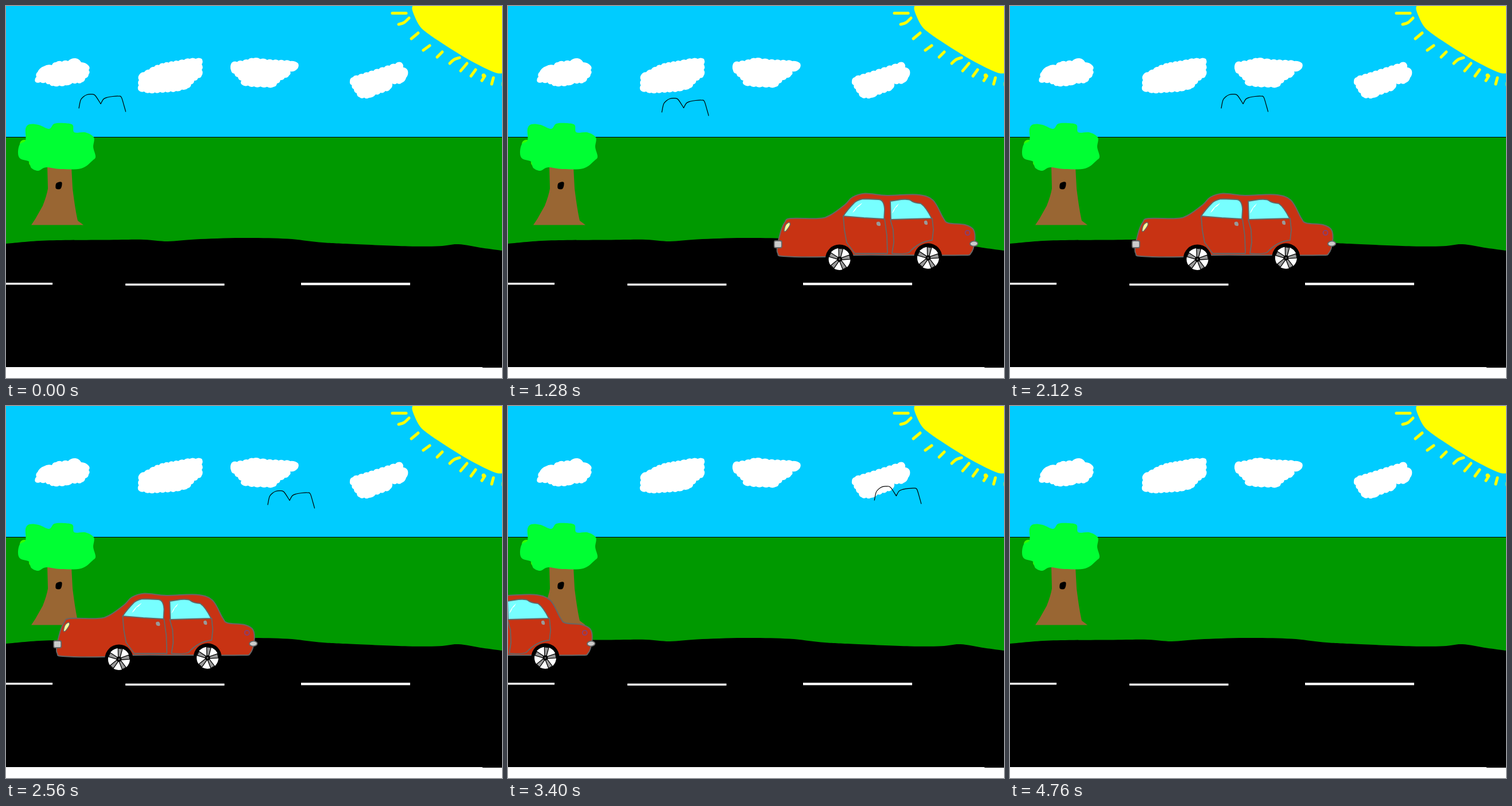
An HTML page with a canvas for the animation above (4800 ms loop, 864x648 px).

```html
<!DOCTYPE html>
<html lang="en">
<head>
<meta charset="utf-8">
<title>Sunday drive</title>
<style>
html, body { margin: 0; width: 100%; height: 100%; overflow: hidden; background: #fff; }
canvas { display: block; }
</style>
</head>
<body>
<canvas id="stage" width="864" height="648"></canvas>
<script>
const LOOP = 4800, STEP = 40;
const ctx = document.getElementById('stage').getContext('2d');

// Smooth curve through flat x,y coordinates.
function curve(coords, closed = false) {
  const n = coords.length / 2, path = new Path2D();
  const at = i => {
    const k = closed ? (i + n) % n : Math.max(0, Math.min(n - 1, i));
    return [coords[2 * k], coords[2 * k + 1]];
  };
  path.moveTo(...at(0));
  for (let i = 0; i < (closed ? n : n - 1); i++) {
    const [a, b, c, d] = [at(i - 1), at(i), at(i + 1), at(i + 2)];
    path.bezierCurveTo(
      b[0] + (c[0] - a[0]) / 6, b[1] + (c[1] - a[1]) / 6,
      c[0] - (d[0] - b[0]) / 6, c[1] - (d[1] - b[1]) / 6, c[0], c[1]);
  }
  if (closed) path.closePath();
  return path;
}
const blob = (...coords) => curve(coords, true);

// Clockwise polygon whose edges are split into small outward bumps.
function puffy(...coords) {
  const n = coords.length, path = new Path2D();
  path.moveTo(coords[0], coords[1]);
  for (let i = 0; i < n; i += 2) {
    const x = coords[i], y = coords[i + 1];
    const dx = coords[(i + 2) % n] - x, dy = coords[(i + 3) % n] - y;
    const length = Math.hypot(dx, dy), bumps = Math.max(1, Math.round(length / 10));
    const bulge = 3.2 / length;
    for (let k = 1; k <= bumps; k++) {
      const mid = (k - .5) / bumps, end = k / bumps;
      path.quadraticCurveTo(x + dx * mid + dy * bulge, y + dy * mid - dx * bulge, x + dx * end, y + dy * end);
    }
  }
  return path;
}

function circle(x, y, r) {
  const path = new Path2D();
  path.arc(x, y, r, 0, 7);
  return path;
}

function fill(path, color) {
  ctx.fillStyle = color;
  ctx.fill(path);
}

function stroke(path, color, width) {
  ctx.strokeStyle = color;
  ctx.lineWidth = width;
  ctx.stroke(path);
}

function box(x, y, w, h, color) {
  ctx.fillStyle = color;
  ctx.fillRect(x, y, w, h);
}

const clouds = [
  puffy(51,132, 55,115, 66,105, 80,103, 87,98, 108,96, 121,91, 131,98, 144,104, 144,119, 132,133,
    116,134, 103,138, 83,139, 69,133),
  puffy(231,147, 232,120, 258,106, 275,100, 300,96, 320,92, 341,92, 341,121, 328,130, 317,143, 296,148, 250,151),
  puffy(392,112, 393,99, 412,96, 431,91, 455,94, 495,96, 509,100, 507,110, 495,114, 493,121, 478,129,
    466,141, 432,140, 411,137, 410,130),
  puffy(599,131, 604,124, 640,113, 668,104, 688,98, 692,107, 700,113, 697,125, 689,134, 673,135,
    669,145, 644,154, 632,160, 616,159, 606,145)
];

// Short sun strokes: start point and offset to the end.
const rays = [
  [673, 12.5, 24, 0], [706, 57, 12, -10], [727, 77, 11, -8], [751, 89, 9, -9], [792, 113, 11, -13],
  [810, 122, 8, -11], [829, 130, 5, -8], [846, 136, 3, -11], [866, 134, 0, 4]
].map(([x, y, dx, dy]) => curve([x, y, x + dx, y + dy]));
rays.push(curve([684,32, 693,29, 702,21]), curve([773,100, 781,93, 790,90]));

const sun = curve([709,-2, 708,8, 720,34, 735,48, 760,65, 790,84, 820,101, 852,116, 866,117]);
sun.lineTo(866, -2);

const road = curve([0,414, 70,408.5, 180,407.5, 240,407, 282,410, 330,406.5, 410,404, 490,405.5,
  545,411.5, 600,414.5, 700,418.5, 755,418.3, 788,415, 830,421.5, 864,426]);
road.lineTo(864, 629);
road.lineTo(0, 629);

const crown = blob(21,256, 24,241, 34,234, 34,214, 41,206, 57,207, 75,214, 84,205, 101,204, 116,207,
  119,220, 138,220, 153,229, 152,246, 156,262, 151,269, 131,283, 95,284, 70,281, 56,287, 44,282, 40,271, 25,266);
const trunk = new Path2D('M72 280L73 318Q71 330 64 348L51 371L44 381.5H135L125 374Q121 358 116 318L114 280Z');
const hollow = blob(87,310, 91,307, 97,307, 97,314, 94,319, 87,318);

const bird = curve([1,25, 4,11, 9,5, 15,1.5, 22,.7, 29,2.5, 39,17.5]);
bird.addPath(curve([39,17.5, 44,9, 51,6, 60,4.5, 70,4, 75,6, 80,22, 82.5,31]));

const body = blob(469,420, 475,393, 482,377, 492,370, 540,370, 560,365, 587,346, 600,333, 622,326.5,
  660,330, 712,328.5, 740,338, 758,369, 767,378, 796,381, 811,390, 813,410, 806,431, 790,434,
  690,434, 605,434, 550,437, 480,436, 470,431);
const frontWindow = new Path2D('M584 366Q592 354 604 342Q612 336 622 336L645 337Q655 337 656 354L655 371L620 369Z');
const rearWindow = new Path2D('M666 340L685 337Q699 336 702 339Q707 343 719 344Q728 350 738 370L700 371L667 372Z');
const frontDoor = new Path2D('M584 366L586 390L590 412Q599 424 604 431H661L660 400L656 371');
const rearDoor = new Path2D('M666 372L671 390L672 412L669 431Q690 433 699 429Q716 410 739 408L741 390L739 370');
const headlight = blob(481,391, 484,381, 490,377, 491,382, 484,392);
const bumper = new Path2D();
bumper.roundRect(463.8, 409, 13, 12, 2.5);
const rearBumper = new Path2D();
rearBumper.ellipse(811.5, 414, 6.8, 4.3, -.05, 0, 7);
const glint = new Path2D('M0 17Q5 7 17 0Q14 5 8 8Q4 15 0 17Z');
const handle = blob(0,1, 5,0, 7,4, 6,7, 1,6);
const spoke = new Path2D('M3 -1.6L18.5 -3.8V3.8L3 1.6Z');

function drawScene() {
  box(0, 0, 864, 648, '#fff');
  box(0, 0, 864, 228, '#0cf');
  box(0, 228, 864, 201, '#090');
  box(0, 228, 864, 1, '#000');
  fill(sun, '#ff0');
  rays.forEach(r => stroke(r, '#ff0', 5));
  fill(circle(832, 121, 3.5), '#ff0');
  clouds.forEach(c => fill(c, '#fff'));
  fill(road, '#000');
  box(830, 628, 34, 2, '#000');
  box(0, 482, 81, 3.5, '#fff');
  box(208, 483.5, 172.5, 3.5, '#fff');
  box(514, 482, 190, 4.3, '#fff');
  fill(trunk, '#963');
  fill(hollow, '#000');
  fill(circle(32, 241, 8), '#3f0');
  fill(circle(46, 273, 6), '#3f0');
  fill(crown, '#0f3');
}

function placed(path, color, x, y, sx = 1) {
  ctx.save();
  ctx.translate(x, y);
  ctx.scale(sx, 1);
  fill(path, color);
  ctx.restore();
}

function drawWheel(x, y) {
  fill(circle(x, y - 1, 24.5), '#000');
  fill(circle(x, y, 19), '#fff');
  ctx.save();
  ctx.translate(x, y);
  ctx.rotate(-1.45);
  for (let i = 0; i < 5; i++) {
    fill(spoke, '#999');
    stroke(spoke, '#000', 1.3);
    ctx.rotate(Math.PI * 2 / 5);
  }
  ctx.restore();
  fill(circle(x, y, 4.5), '#000');
  fill(circle(x, y, 1.5), '#666');
}

function drawCar(left) {
  const gray = '#666';
  const part = (path, color, width = 1.8) => {
    fill(path, color);
    stroke(path, gray, width);
  };
  ctx.save();
  ctx.translate(left - 463, 0);
  part(body, '#c83313', 2);
  stroke(frontDoor, gray, 1.8);
  stroke(rearDoor, gray, 1.8);
  part(frontWindow, '#7ff');
  part(rearWindow, '#7ff');
  placed(glint, '#fff', 600, 343);
  placed(glint, '#fff', 669, 344, .7);
  placed(handle, '#999', 642, 376);
  placed(handle, '#999', 725, 374, .85);
  part(headlight, '#ff9', 1.5);
  part(bumper, '#ccc');
  stroke(circle(800.5, 395, 4), '#748', 1.6);
  part(rearBumper, '#ccc');
  drawWheel(577.5, 441);
  drawWheel(731.8, 438.8);
  ctx.restore();
}

// Keys are [step, x] or [step, x, y], with straight moves between them.
const carKeys = [[0, 866], [16, 665], [32, 463], [42, 344], [56, 176], [70, 12], [75, -60], [96, -362], [120, -362]];
const birdKeys = [[0, 126, 153], [14, 183, 184], [16, 194, 188], [28, 251, 167], [32, 267, 160],
  [42, 315, 147], [48, 344, 132], [53, 367, 153], [58, 405, 144], [70, 505, 150], [75, 548.5, 147],
  [84, 629, 139], [98, 745, 141], [99, 748.5, 147], [104, 778, 168], [112, 824, 162], [119, 866, 151], [120, 866, 151]];

function pose(keys, step) {
  const i = keys.findIndex(k => k[0] > step);
  const a = keys[i - 1], b = keys[i], p = (step - a[0]) / (b[0] - a[0]);
  return a.slice(1).map((v, j) => v + (b[j + 1] - v) * p);
}

function render() {
  const step = Math.floor((performance.now() % LOOP) / STEP);
  ctx.lineCap = ctx.lineJoin = 'round';
  drawScene();
  ctx.save();
  ctx.translate(...pose(birdKeys, step));
  stroke(bird, '#000', 1.2);
  ctx.restore();
  drawCar(pose(carKeys, step)[0]);
  requestAnimationFrame(render);
}
render();
</script>
</body>
</html>
```
